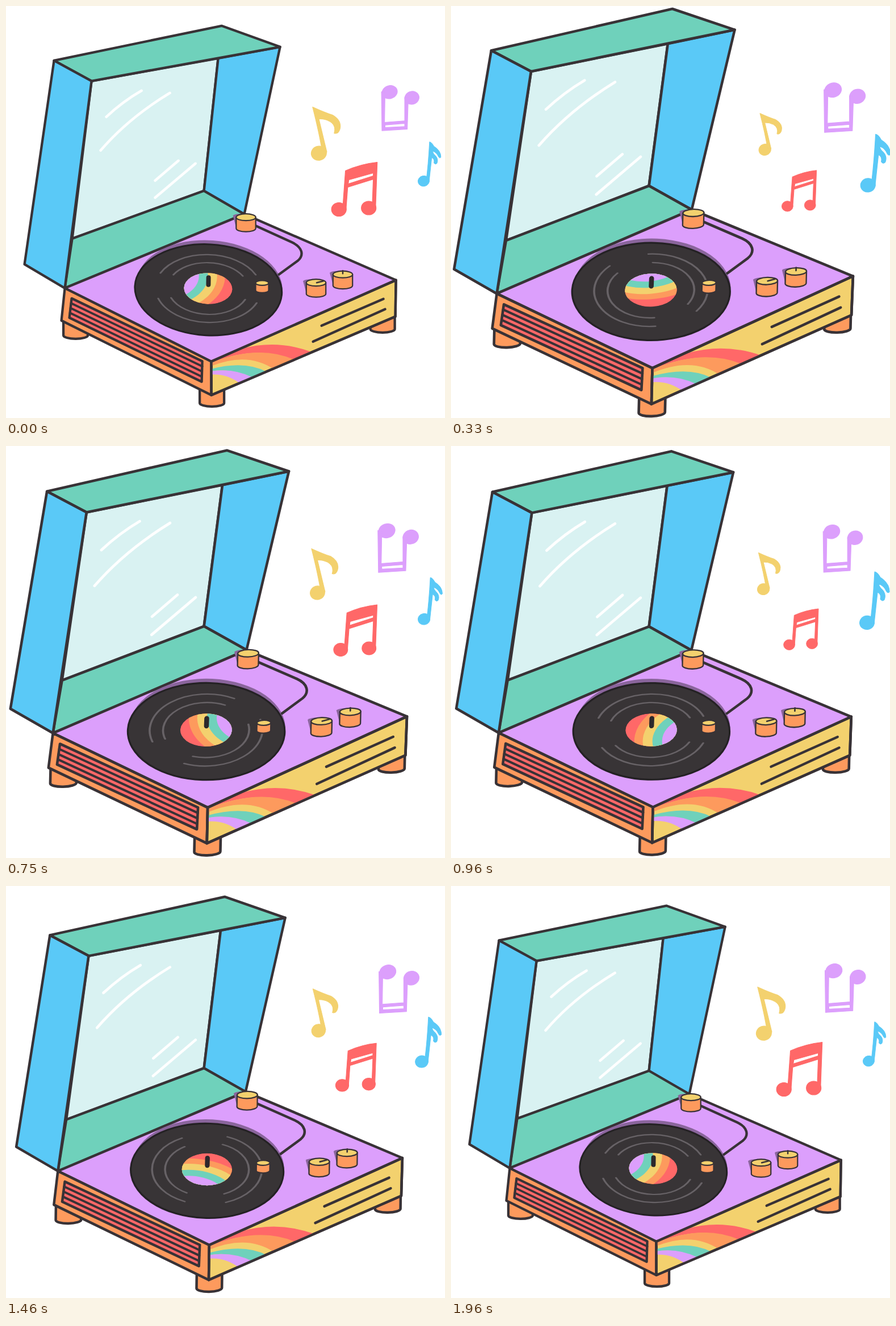
These frames come from a looping animation (773x724 px, 2000 ms). An HTML page:

```html
<!DOCTYPE html>
<html lang="en">
<head>
<meta charset="utf-8">
<title>Record player</title>
<style>
  html, body { margin: 0; width: 100%; height: 100%; overflow: hidden; background: #fff; }
  svg { display: block; width: 100%; height: 100%; }
  .ink { stroke: #383236; stroke-width: 4.3; stroke-linejoin: round; stroke-linecap: round; }
  .line { fill: none; }
  .green { fill: #6fd1bb; }
  .blue { fill: #5ac9f7; }
  .glass { fill: #d9f2f2; }
  .purple { fill: #dc9ffc; }
  .orange { fill: #fd9a5d; }
  .yellow { fill: #f3d16e; }
  .red { fill: #ff6868; }
  .vinyl { fill: #383436; }
  .shade { fill: #8a659c; }
  .shine { fill: none; stroke: #fff; stroke-width: 4.5; stroke-linecap: round; }
  .groove { fill: none; stroke: #676266; stroke-width: 3.4; stroke-linecap: round; }
  .grille { stroke-width: 3.8; }
  .note { stroke-width: 1.2; stroke-linejoin: round; }
  .note.yellow { stroke: #f3d16e; }
  .note.red { stroke: #ff6868; }
  .note.purple { stroke: #dc9ffc; }
  .note.blue { stroke: #5ac9f7; }
</style>
</head>
<body>
<svg viewBox="0 0 773 724">
  <defs>
    <clipPath id="side"><path d="M361 625 686 482 685 546 361 684z"/></clipPath>
    <clipPath id="disc"><circle r="42.5"/></clipPath>
  </defs>

  <g id="player"><g transform="translate(.6 -.2)">
    <g id="feet"></g>

    <!-- lid -->
    <g class="ink">
      <path class="glass" d="M150 132 373 92 348 325 116 409z"/>
      <path class="blue" d="M373 92 482 72 419 366 348 325z"/>
      <path class="green" d="M116 409 348 325 419 366 103 496z"/>
      <path class="green" d="M84 96 379 35 482 72 150 132z"/>
      <path class="blue" d="M84 96 150 132 103 496 32 454z"/>
    </g>
    <path class="shine" d="M176 195Q205 168 238 149M166 254Q215 197 288 153M262 307 303 272M262 337 333 277"/>

    <!-- base -->
    <g class="ink">
      <path class="purple" d="M103 496 419 366 686 482 361 625z"/>
      <path class="orange" d="M103 496 361 625 361 684 97 553z"/>
      <path class="yellow" d="M361 625 686 482 685 546 361 684z"/>
      <path class="red" d="M115 514 345 624.5 344 660.5 111 548z"/>
      <path class="line grille" d="M114 522.5 345 633.5M113 531 344.5 642.5M112 539.5 344 651.5"/>
      <path class="line" d="M555 562 664 515M540 590 667 533"/>
    </g>
    <g clip-path="url(#side)">
      <path class="red" d="M361 625Q450 575 540 609L508 624Q445 594 361 627z"/>
      <path class="orange" d="M361 627Q445 594 508 622L472 639Q425 607 361 633z"/>
      <path class="green" d="M361 638Q420 623 458 643L434 655Q400 636 361 642z"/>
      <path class="purple" d="M361 642Q400 636 434 653L412 664Q388 646 361 648z"/>
    </g>
    <path class="ink line" d="M361 684V625L686 482 685 546z"/>

    <!-- record -->
    <ellipse class="shade" cx="358" cy="491.5" rx="128" ry="79.5" transform="rotate(4 358 491.5)"/>
    <ellipse class="vinyl" rx="129.5" ry="80" stroke="#242124" stroke-width="3" transform="translate(355.7 499) rotate(3)"/>
    <g transform="translate(355.4 496.7) rotate(2) scale(1 .64)">
      <g id="spin">
        <g id="grooves"></g>
        <g id="label" clip-path="url(#disc)"></g>
      </g>
    </g>
    <path d="M356 477.5 355.8 490" fill="none" stroke="#2c282b" stroke-width="8" stroke-linecap="round"/>

    <path class="ink line" d="M438 386 503 415.5C521 424 525 438 513 448L480 472"/>
    <g id="knobs" transform="translate(.4 -.6)"></g>
  </g></g>

  <g id="yellowNote" class="note yellow">
    <ellipse cx="551" cy="259" rx="13.5" ry="12.5" transform="rotate(-15 551 259)"/>
    <path d="M540 178Q562 188 575 192Q592 202 588 217Q585 226 578 224Q582 210 570 203Q560 198 551 199L565 257 557 257Q552 225 540 178z"/>
  </g>
  <g id="redNote" class="note red">
    <ellipse cx="586.5" cy="357" rx="13" ry="12"/>
    <ellipse cx="639" cy="354.5" rx="13" ry="12"/>
    <path d="M598 289Q625 277 654 274L651 356 645 356 647 304 602 318 599 358 593 358zM604 305 603 312 647 298 647 293z" fill-rule="evenodd"/>
  </g>
  <g id="purpleNote" class="note purple">
    <ellipse cx="673" cy="147.5" rx="15" ry="12.5" transform="rotate(-18 673 147.5)"/>
    <ellipse cx="716" cy="158.5" rx="14" ry="12.5" transform="rotate(-18 716 158.5)"/>
    <path d="M657 147H664L663 206 702 203 702 158H709L707 219 658 222zM664 211V216L702 214V208z" fill-rule="evenodd"/>
  </g>
  <g id="blueNote" class="note blue">
    <ellipse cx="733.5" cy="314.5" rx="13" ry="12" transform="rotate(-12 733.5 314.5)"/>
    <path d="M747 225Q752 226 757 235Q773 245 773 260Q770 264 767 258Q763 249 754 246Q755 252 760 256Q768 264 764 274Q760 278 757 273Q759 264 752 261L746 316 739 316Q744 280 747 225z"/>
  </g>
</svg>

<script>
  const $ = id => document.getElementById(id);
  const LOOP = 2000, FPS = 24, LAST = 47;

  // Upright cylinder: centre x, top y, radii, height
  const barrel = (x, y, rx, ry, h, w) => `<path class="orange ink" style="stroke-width:${w}"
    d="M${x - rx} ${y}V${y + h}A${rx} ${ry} 0 0 0 ${x + rx} ${y + h}V${y}z"/>`;
  const knob = (x, y, rx, ry, h) => barrel(x, y, rx, ry, h, 2.2) +
    `<ellipse class="yellow ink" style="stroke-width:2.2" cx="${x}" cy="${y}" rx="${rx}" ry="${ry}"/>`;
  const shadow = (x, y) => `<path class="shade" d="M${x - 23} ${y - 3}Q${x - 18} ${y - 7} ${x} ${y - 6}V${y + 19}H${x - 17}z"/>`;

  $('feet').innerHTML = [[122, 545, 34], [362, 670, 28], [662.5, 535, 33]]
    .map(([x, y, h]) => barrel(x, y, 21.5, 6, h, 4.3)).join('');
  $('knobs').innerHTML = [[421.5, 372], [545, 487], [592, 472.5]]
    .map(([x, y]) => shadow(x, y) + knob(x, y, 17.2, 6, 19.5)).join('') + knob(450, 487.5, 11.5, 4.2, 13) +
    '<path class="ink line" style="stroke-width:2.5" d="M546 487 558 484M592 466V471"/>';

  const arc = (r, from, to) => {
    const at = a => `${r * Math.cos(a * Math.PI / 180)} ${r * Math.sin(a * Math.PI / 180)}`;
    return `<path class="groove" d="M${at(from)}A${r} ${r} 0 0 1 ${at(to)}"/>`;
  };
  $('grooves').innerHTML = arc(93, 204, 333) + arc(93, 22, 160) + arc(71, 209, 328) + arc(71, 22, 156);
  $('label').innerHTML = '<circle class="red" r="43"/>' +
    [['orange', 115], ['yellow', 101], ['green', 85], ['purple', 69]]
      .map(([c, r]) => `<circle class="${c}" cx="-86" cy="-32" r="${r}"/>`).join('');

  const smooth = u => u * u * (3 - 2 * u);
  const clamp = u => Math.min(1, Math.max(0, u));

  // Elastic stretch, then a soft return
  const stretch = ms => .86 * (1 - Math.exp(-.004 * ms) * Math.cos(Math.PI * ms / 255)) *
    (1 - smooth(clamp((ms - 1060) / 940)));

  const purpleKeys = [[0, .91], [330, 1], [580, 1], [960, .955], [1290, .965], [1670, .98], [2000, .98]];
  const track = (keys, ms) => {
    const i = keys.findIndex(k => k[0] > ms), [a, p] = keys[i - 1], [b, q] = keys[i];
    return p + (q - p) * smooth((ms - a) / (b - a));
  };

  // Scale a note about its centre (cx, cy) and put that centre at (x, y)
  const place = (id, cx, cy, x, y, s) =>
    $(id).setAttribute('transform', `translate(${x} ${y}) scale(${s}) translate(${-cx} ${-cy})`);

  function draw(now) {
    const step = Math.min(LAST, Math.floor((now % LOOP) * FPS / 1000 + .1));
    const ms = step * 1000 / FPS, turn = step / LAST, a = turn * 2 * Math.PI;
    const { sin, cos } = Math;

    const k = stretch(ms);
    $('player').setAttribute('transform', `matrix(${[1 + .0761 * k, -.0272 * k, -.0272 * k,
      1 + .0701 * k, -17.64 * k, -22.2 * k]})`);
    $('spin').setAttribute('transform', `rotate(${360 * turn})`);

    const beat = (1 + cos(3 * a)) / 2;
    place('yellowNote', 563.5, 225, 561.7 + 1.7 * cos(a), 224.6 + 1.2 * sin(a), .79 + .21 * beat);
    place('redNote', 613.5, 321.5, 614.7 - 2 * cos(a - .7), 322 + 3.3 * sin(a), .76 + .24 * beat);
    place('blueNote', 746.5, 276, 745.4 + 2 * sin(a), 275 + 3 * cos(a), 1 - .23 * beat);
    place('purpleNote', 693.5, 178, 692.2 + 2.1 * cos(a), 179.5 - 1.3 * sin(a + .35), track(purpleKeys, ms));
  }

  const start = performance.now();
  function tick() {
    draw(performance.now() - start);
    requestAnimationFrame(tick);
  }
  tick();
</script>
</body>
</html>
```
